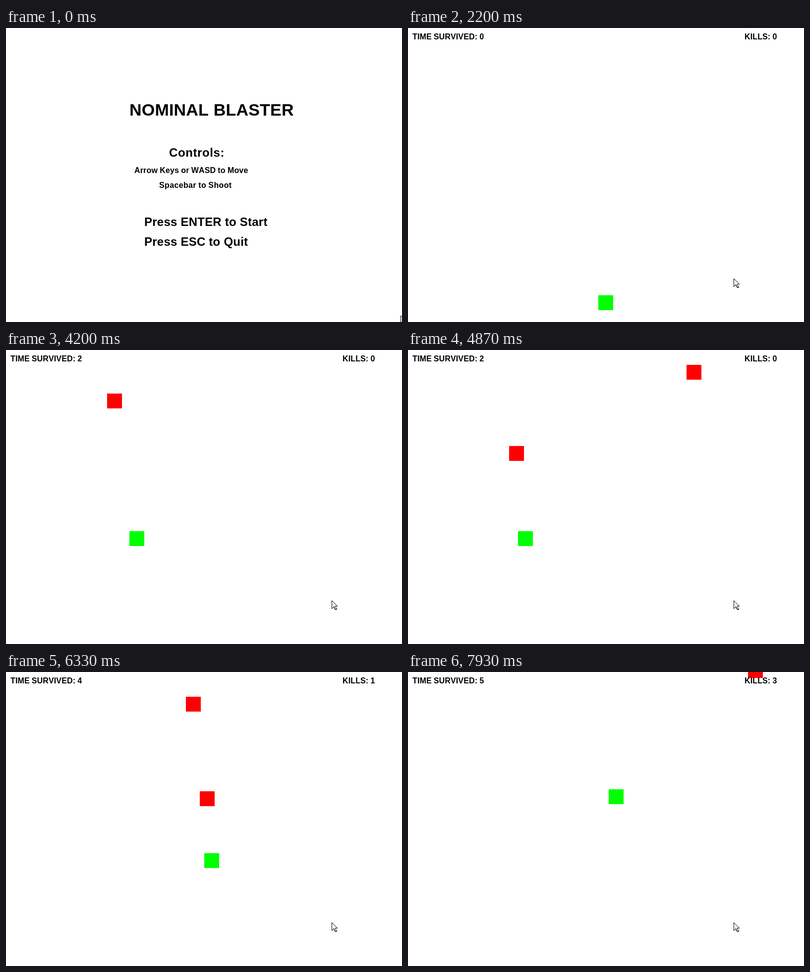
An HTML page that plays this animation: 799x594 px, repeating every 8000 ms.

```html
<!DOCTYPE html>
<html lang="en">
<head>
<meta charset="utf-8">
<title>Square shooter</title>
<style>
  html, body { margin: 0; width: 100%; height: 100%; overflow: hidden; background: #fff; }
  svg { display: block; width: 799px; height: 594px; }
  text {
    font: bold 16px "Liberation Sans", Arial, sans-serif;
    font-kerning: none; letter-spacing: .13px; word-spacing: -.5px;
  }
  .title { font-size: 34px; letter-spacing: .2px; word-spacing: 0; }
  .big { font-size: 24px; letter-spacing: .23px; word-spacing: 0; }
</style>
</head>
<body>
<svg viewBox="0 0 799 594">
  <g id="menu">
    <text class="title" x="249" y="177">NOMINAL BLASTER</text>
    <text class="big" x="329" y="260" style="letter-spacing:.6px">Controls:</text>
    <text x="259" y="293" style="letter-spacing:.17px">Arrow Keys or WASD to Move</text>
    <text x="309" y="323" style="letter-spacing:.36px">Spacebar to Shoot</text>
    <text class="big" x="279" y="400">Press ENTER to Start</text>
    <text class="big" x="279" y="440">Press ESC to Quit</text>
  </g>
  <g id="game">
    <g id="squares"></g>
    <text id="time" x="9" y="23"></text>
    <text id="kills" x="679" y="23"></text>
  </g>
  <path id="cursor" d="M.5.5V16.5L4.5 12.5 7.5 18.5H9.5L10 17.5 7.5 12V11.5H11.5Z"
    fill="#fff" stroke="#000" shape-rendering="crispEdges"/>
</svg>
<script>
const LOOP = 8000, STEP = 200 / 3, START = 2200, SPEED = .236;
const $ = id => document.getElementById(id);

// Key presses: when, which way, how many pixels
const presses = [
  [2533, "up", 108], [2970, "left", 37], [3154, "right", 67],
  [3500, "left", 245], [3800, "up", 66], [4642, "right", 62],
  [5597, "right", 169], [6491, "left", 67], [6704, "up", 87],
  [7490, "right", 72], [7700, "up", 42]
];
const dirs = { up: [0, -1], left: [-1, 0], right: [1, 0] };

const enemies = [
  { born: 3466, x: 88, y: -28, speed: .1586, shot: 5260 },
  { born: 4533, x: 610, y: -18, speed: .1436, shot: 6395 },
  { born: 5733, x: 336, y: -29, speed: .1324, shot: 7260 },
  { born: 7866, x: 695, y: -27, speed: .135, shot: LOOP }
];

function playerAt(t) {
  let x = 384, y = 540;
  for (const [from, way, length] of presses) {
    const d = Math.min(Math.max(0, t - from) * SPEED, length);
    x += dirs[way][0] * d;
    y += dirs[way][1] * d;
  }
  return [x, y];
}

// An enemy falls steadily while chasing the player sideways
function enemyAt({ born, x, y, speed }, t) {
  for (let s = born; s < t; s += 4) {
    const d = speed * Math.min(4, t - s);
    x += Math.max(-d, Math.min(d, playerAt(s)[0] - x));
    y += d;
  }
  return [x, y];
}

function pointerAt(t) {
  if (t >= 860) return [657, 506];
  const left = (1 - Math.min(t / 400, 1)) ** 1.6;
  return [651 + 145 * left, 496 + 85 * left];
}

function addSquare(color) {
  const r = document.createElementNS("http://www.w3.org/2000/svg", "rect");
  r.setAttribute("width", 30);
  r.setAttribute("height", 30);
  r.setAttribute("fill", color);
  return $("squares").appendChild(r);
}

function move(el, [x, y]) {
  el.setAttribute("transform", `translate(${Math.round(x)} ${Math.round(y)})`);
}

function show(el, on) {
  el.style.display = on ? "" : "none";
}

const hero = addSquare("#0f0");
const foes = enemies.map(() => addSquare("#f00"));

function draw(now) {
  const t = Math.min(Math.floor((now % LOOP + 4) / STEP), 119) * STEP;
  show($("menu"), t < START);
  show($("game"), t >= START);
  move($("cursor"), pointerAt(t));
  move(hero, playerAt(t));
  enemies.forEach((enemy, i) => {
    show(foes[i], t >= enemy.born && t < enemy.shot);
    move(foes[i], enemyAt(enemy, t));
  });
  $("time").textContent = "TIME SURVIVED: " + Math.max(0, Math.floor((t - START) / 1000));
  $("kills").textContent = "KILLS: " + enemies.filter(e => t >= e.shot).length;
}

let begin;
function tick(now) {
  begin ??= now;
  draw(now - begin);
  requestAnimationFrame(tick);
}
draw(0);
requestAnimationFrame(tick);
</script>
</body>
</html>
```
